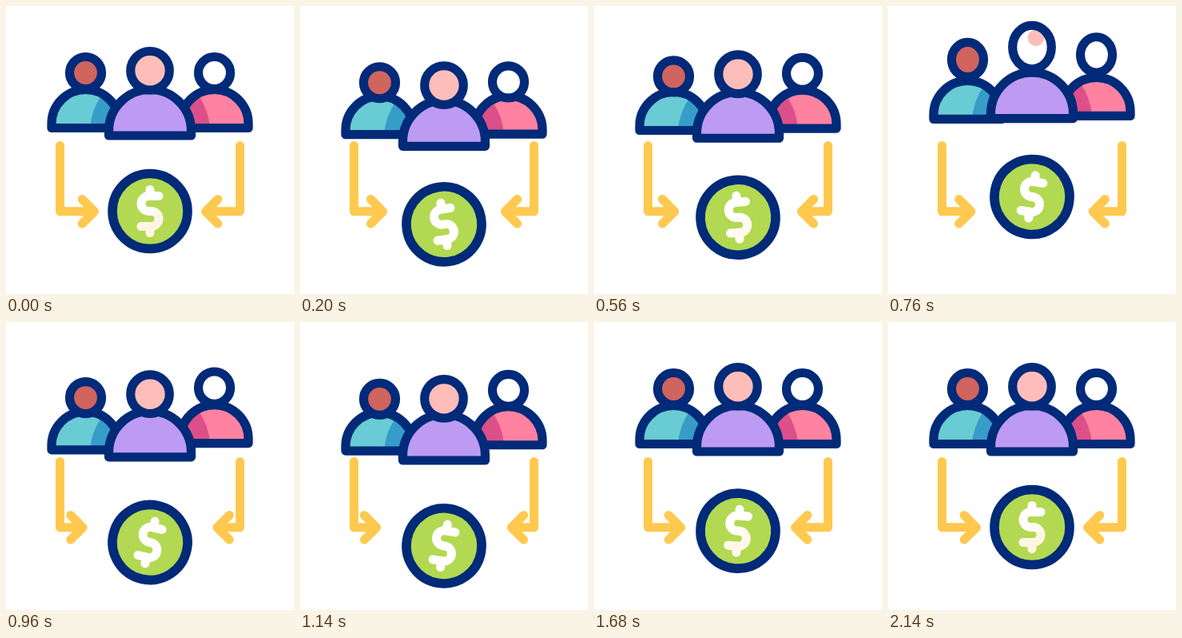
Write an HTML page with a canvas that moves like this. It is 360 px wide and 360 px high and loops after 2400 ms.

```html
<!DOCTYPE html>
<html lang="en">
<head>
<meta charset="utf-8">
<title>Group funding</title>
<style>
html, body { margin: 0; width: 100%; height: 100%; overflow: hidden; background: #fff; }
canvas { display: block; width: 360px; height: 360px; }
</style>
</head>
<body>
<canvas id="stage"></canvas>
<script>
const LOOP = 2400;
const NAVY = '#012a79', GOLD = '#ffc94f', WHITE = '#fff';
const BEATS = [0, 380, 760, 1060, 1320, 1560, 1780];
const TAU = 2 * Math.PI;
const canvas = document.getElementById('stage');
const dpr = window.devicePixelRatio || 1;
canvas.width = canvas.height = Math.round(360 * dpr);
const ctx = canvas.getContext('2d');

// Eases from rest through one value per beat and back to rest.
function swing(...peaks) {
  const value = i => peaks[i - 1] || 0;
  return t => {
    const i = BEATS.findIndex(b => b > t);
    if (i < 0) return 0;
    const p = (t - BEATS[i - 1]) / (BEATS[i] - BEATS[i - 1]);
    const ease = (1 - Math.cos(Math.PI * p)) / 2;
    return value(i - 1) + (value(i) - value(i - 1)) * ease;
  };
}

const sidePerson = { headY: 83.5, headR: 20, base: 152.5, half: 42.5, follow: 0.67 };
const people = [
  { ...sidePerson, x: 99.5, side: 1, skin: '#d0645f', shirt: '#69cbd3', shade: '#369dc8',
    hop: swing(22.5, -16.5, 20, -12.5) },
  { ...sidePerson, x: 260.5, side: -1, skin: WHITE, shirt: '#ff82a1', shade: '#dd4f88',
    hop: swing(21, -22.5, 5.5, -11) },
  { x: 180, headY: 80.8, headR: 24.3, base: 162, half: 51.5, follow: 0.73,
    side: 0, skin: '#ffbdb9', shirt: '#bd9bf3', hop: swing(33.5, -29.3, 22, -9.5) }
];
const coinDrop = swing(30, -18, 31, -3.5, 11);
const coinTurn = swing(-16, 9, 14.3, -8, 10.5);
const pull = swing(12.5, 6.5, 17, 7, 4.6);

function fill(shape, color) {
  ctx.fillStyle = color;
  ctx.fill(shape);
}

function outline(shape, color, width) {
  ctx.strokeStyle = color;
  ctx.lineWidth = width;
  ctx.stroke(shape);
}

// Paints a second colour inside a shape.
function tint(shape, patch, color) {
  ctx.save();
  ctx.clip(shape);
  fill(patch, color);
  ctx.restore();
}

function drawBody(p, hop) {
  const bottom = p.base + hop * p.follow;
  const top = 104.5 + hop * p.follow;
  const shape = new Path2D();
  shape.moveTo(p.x - p.half, bottom);
  shape.arc(p.x, top + p.half, p.half, Math.PI, TAU);
  shape.lineTo(p.x + p.half, bottom);
  shape.closePath();
  fill(shape, p.shirt);
  if (p.side) {
    const x = d => p.x + p.side * d;
    const patch = new Path2D();
    patch.moveTo(x(5.5), bottom);
    patch.quadraticCurveTo(x(7), bottom - 22, x(20), top + 7);
    patch.lineTo(x(60), top);
    patch.lineTo(x(60), bottom);
    tint(shape, patch, p.shade);
  }
  outline(shape, NAVY, 11.2);
}

function drawHead(p, hop) {
  const y = p.headY + hop;
  const lift = Math.max(0, -hop);
  const shape = new Path2D();
  shape.ellipse(p.x, y, p.headR, p.headR + lift * 0.1, 0, 0, TAU);
  fill(shape, p.side ? p.skin : WHITE);
  if (!p.side) {
    // The skin tone shrinks to a patch as the head lifts.
    const patch = new Path2D();
    const r = Math.max(22 - 0.4 * lift, 40 - 3 * lift);
    patch.arc(p.x + 0.17 * lift, y - 8 - 0.13 * lift, r, 0, TAU);
    tint(shape, patch, p.skin);
  }
  outline(shape, NAVY, 11.2);
}

function drawArrow(t) {
  const tip = 110.5 - pull(t), y = 256.8, wing = 15.3;
  const shape = new Path2D();
  shape.moveTo(67.5, 174.5);
  shape.lineTo(67.5, y);
  shape.lineTo(tip, y);
  shape.moveTo(tip - wing, y - wing);
  shape.lineTo(tip, y);
  shape.lineTo(tip - wing, y + wing);
  outline(shape, GOLD, 11);
}

function drawCoin(t) {
  const drop = coinDrop(t);
  ctx.save();
  ctx.translate(180, 256.5 + drop);
  ctx.rotate(coinTurn(t) * Math.PI / 180);
  const disc = new Path2D();
  disc.arc(0, 0, 47, 0, TAU);
  fill(disc, '#b2d951');
  outline(disc, NAVY, 11.6);

  // The cream tint fades away from the resting place.
  const cream = Math.max(0, 1 - Math.abs(drop) / 15);
  const ink = ctx.createLinearGradient(-6, -4, 4, 14);
  ink.addColorStop(0, WHITE);
  ink.addColorStop(1, `rgb(255, ${255 - 10 * cream}, ${255 - 30 * cream})`);
  const r = 9.5, q = Math.PI / 2;
  const sign = new Path2D();
  sign.moveTo(0, -27);
  sign.lineTo(0, -2 * r);
  sign.moveTo(11, -2 * r);
  sign.arc(-1.5, -r, r, -q, q, true);
  sign.arc(1.5, r, r, -q, q);
  sign.lineTo(-11, 2 * r);
  sign.moveTo(0, 2 * r);
  sign.lineTo(0, 27);
  outline(sign, ink, 11);
  ctx.restore();
}

function draw(t) {
  ctx.setTransform(dpr, 0, 0, dpr, 0, 0);
  ctx.fillStyle = WHITE;
  ctx.fillRect(0, 0, 360, 360);
  ctx.lineCap = ctx.lineJoin = 'round';
  for (const p of people) {
    const hop = p.hop(t);
    drawBody(p, hop);
    drawHead(p, hop);
  }
  drawCoin(t);
  drawArrow(t);
  ctx.translate(360, 0);
  ctx.scale(-1, 1);
  drawArrow(t);
}

const start = performance.now();
function tick() {
  draw((performance.now() - start) % LOOP);
  requestAnimationFrame(tick);
}
tick();
</script>
</body>
</html>
```
